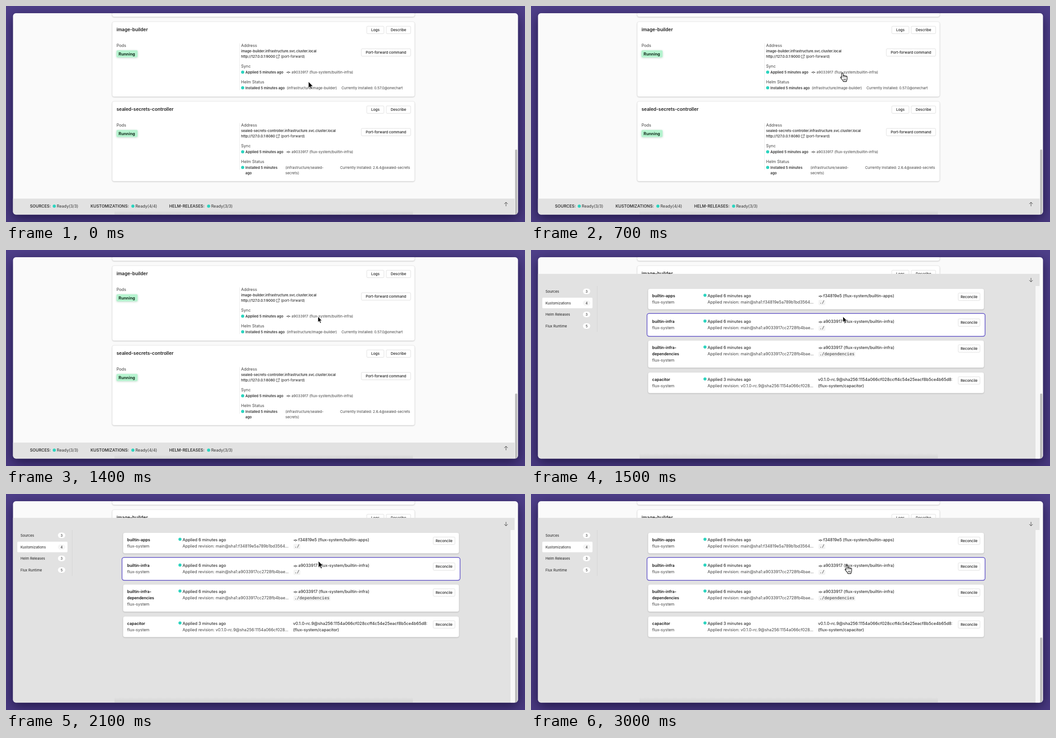
These frames come from a looping animation (1148 px wide and 480 px high, 3100 ms). An HTML page:

```html
<!DOCTYPE html>
<html lang="en">
<head>
<meta charset="utf-8">
<title>Cluster services</title>
<style>
html, body { margin: 0; width: 100%; height: 100%; overflow: hidden; background: #4a3b82; }
svg { display: block; width: 1148px; height: 480px; font-family: Inter, "Liberation Sans", sans-serif; }
text { white-space: pre; }
.mono { font-family: "DejaVu Sans Mono", monospace; }
.card { fill: #fff; stroke: #dedede; stroke-width: .6; filter: drop-shadow(0 1px 1.2px rgba(0,0,0,.18)); }
.selected { fill: #fff; stroke: #5d4fc6; stroke-width: 1.5; }
.button { fill: #fff; stroke: #d6d6d6; stroke-width: .8; }
.window { fill: #fafafa; filter: drop-shadow(0 7px 13px rgba(14,6,46,.68)); }
</style>
</head>
<body>
<svg id="stage" viewBox="0 0 1148 480"></svg>
<script>
const TEAL = '#2dd4bf', INK = '#1f1f1f', GREY = '#404040', PANEL = '#e2e2e2';

const text = (x, y, s, size = 9, weight = 400, fill = GREY, extra = '') =>
  `<text x="${x}" y="${y}" font-size="${size}" font-weight="${weight}" fill="${fill}" ${extra}>${s}</text>`;
const rect = (x, y, w, h, fill, r = 0, extra = '') =>
  `<rect x="${x}" y="${y}" width="${w}" height="${h}" rx="${r}" fill="${fill}" ${extra}/>`;
const box = (kind, x, y, w, h, r) => rect(x, y, w, h, '#fff', r, `class="${kind}"`);
const dot = (x, y, r = 3.5) => `<circle cx="${x}" cy="${y}" r="${r}" fill="${TEAL}"/>`;
const line = (d, color = INK, w = .9) => `<path d="${d}" fill="none" stroke="${color}" stroke-width="${w}"/>`;
const centred = (x, y, s, size, weight, fill) => text(x, y, s, size, weight, fill, 'text-anchor="middle"');
const button = (x, y, w, s) =>
  box('button', x, y, w, 16.5, 2) + centred(x + w / 2, y + 11.2, s, 8, 500, INK);
const commit = (x, y) =>
  line(`M${x} ${y}h2.6m3.4 0h2.6`) + `<circle cx="${x + 4.3}" cy="${y}" r="1.7" fill="none" stroke="${INK}" stroke-width=".9"/>`;
const arrow = (y, dir) => line(`M1106 ${y - 4.5}v9m-4 ${dir > 0 ? -4 : -5}l4 ${dir * 4}l4 ${-dir * 4}`, '#444', 1);

function service(y, height, name, port, helm) {
  return `<g transform="translate(0 ${y})">` + box('card', 235, 0, 669, height, 4) +
    text(244.5, 21.3, name, 10.2, 600, INK) +
    button(798, 10, 38, 'Logs') + button(841, 10, 54, 'Describe') +
    text(244.5, 56, 'Pods') +
    rect(244.5, 63.5, 46.5, 15.5, '#b5f3cf', 2, 'style="filter:drop-shadow(0 1.5px 2px rgba(60,140,95,.35))"') +
    text(249, 74.6, 'Running', 9, 700, '#14301f') +
    line('M516.5 48V152', '#ececec', 1) +
    text(520, 56, 'Address') +
    text(520, 68.3, name + '.infrastructure.svc.cluster.local', 7.75, 500, INK) +
    text(520, 80, 'http://127.0.0.1:' + port, 7.75, 500, INK) +
    line('M601 74.6h-3v6h6v-3M602 73.8h3v3M605 73.8l-4.2 4.2', GREY, .8) +
    text(608, 80, '(port-forward)', 7.85, 400, INK) +
    button(786, 60, 109, 'Port-forward command') +
    text(520, 102.3, 'Sync') + dot(523.5, 112) +
    text(529.5, 114.8, 'Applied 5 minutes ago', 7.8, 600, '#333') +
    commit(620.3, 112.4) +
    text(631.5, 114.8, 'a9033917 (flux-system/builtin-infra)', 8) +
    text(520, 137.3, 'Helm Status') + dot(523.5, 146.8) + helm + '</g>';
}

const bold = (x, y, s) => text(x, y, s, 7.8, 600, '#333');
const small = (x, y, s) => text(x, y, s, 7.9);

const services =
  box('card', 235, 0, 669, 24, 4) +
  service(35, 166.5, 'image-builder', 9000,
    bold(529.5, 149.8, 'Installed 5 minutes ago') +
    small(621, 149.8, '(infrastructure/image-builder)') +
    small(742, 149.8, 'Currently Installed: 0.57.0@onechart')) +
  service(212, 177.5, 'sealed-secrets-controller', 8080,
    bold(529.5, 149.8, 'Installed 5 minutes') + bold(529.5, 161.5, 'ago') +
    small(618, 149.8, '(infrastructure/sealed-') + small(618, 161.5, 'secrets)') +
    small(739, 149.8, 'Currently Installed: 2.6.4@sealed-secrets'));

const status = (x, label, dotX, count) =>
  text(x, 447.8, label, 9, 600, '#333') + dot(dotX, 444.8) + text(dotX + 5.5, 447.8, `Ready(${count})`, 9, 400, '#333');

const footer = rect(15, 428, 1110, 36, PANEL) + rect(240, 455, 660, 9, 'url(#fade)') +
  status(53, 'SOURCES:', 106.8, '3/3') +
  status(187, 'KUSTOMIZATIONS:', 280.7, '4/4') +
  status(361, 'HELM-RELEASES:', 448.2, '3/3') + arrow(440.5, -1);

const tab = (y, name, count, on) =>
  (on ? rect(25, y - 12, 111, 23.5, '#fff', 2) : '') +
  text(32, y + 2.8, name, 7.8, 400, INK) +
  rect(115, y - 6.3, 16, 12.4, on ? '#f5f5f5' : '#fff', 6.2) +
  centred(123, y + 2.5, count, 7, 500, '#333');

function row(y, height, names, age, revision, source, path, selected) {
  const last = names.length - 1, pad = selected ? 2.4 : 0;
  return `<g transform="translate(0 ${y})">` +
    box(selected ? 'selected' : 'card', 259 - pad, -pad, 743 + 2 * pad, height + 2 * pad, 4 + pad / 4) +
    names.map((s, i) => text(268, 19 + 14 * i, s, 8.7, 600, '#111')).join('') +
    text(268, 33 + 14 * last, 'flux-system', 8.85) +
    dot(384.8, 14.6, 3.4) + text(390.5, 19, `Applied ${age} minutes ago`, 9, 500, '#333') +
    text(390.5, 33, `Applied revision: ${revision}...`, 9) +
    (path
      ? commit(636, 16.8) + text(646.5, 19, source, 9.05, 500, '#333') +
        rect(636, 25, path.length * 5.54 + 4, 11.5, '#f3f3f3', 2) +
        text(638, 33, path, 9.2, 400, '#333', 'class="mono"')
      : text(635, 19, source, 9.15, 500, '#333', 'clip-path="url(#cell)"') +
        text(635, 33, '(flux-system/capacitor)', 9, 500, '#333')) +
    button(945, 9.7, 48, 'Reconcile') + '</g>';
}

const infra = 'a9033917 (flux-system/builtin-infra)', infraRev = 'main@sha1:a9033917cc2728fb4bae';
const panel = rect(15, 53, 1110, 411, PANEL) + rect(1116, 80, 9, 384, '#f7f7f7') +
  rect(240, 452, 660, 12, 'url(#fade)') + arrow(66.5, 1) +
  tab(92, 'Sources', 3) + tab(118, 'Kustomizations', 4, true) +
  tab(143.3, 'Helm Releases', 3) + tab(169, 'Flux Runtime', 5) +
  line('M146.5 80V182', '#d5d5d5', 1) +
  row(86, 46, ['builtin-apps'], 6, 'main@sha1:f34819e5a789b1bd3564', 'f34819e5 (flux-system/builtin-apps)', './') +
  row(143.3, 46, ['builtin-infra'], 6, infraRev, infra, './', true) +
  row(201, 60.5, ['builtin-infra-', 'dependencies'], 6, infraRev, infra, './dependencies') +
  row(272, 46, ['capacitor'], 3, 'v0.1.0-rc.9@sha256:1154a066cf028',
    'v0.1.0-rc.9@sha256:1154a066cf028ccff4c54e25eacf8b5ce4b65d8:');

const cursors =
  `<g id="cursor"><path id="pointer" d="M0 0V14.4L3.3 11.3L5.7 16.8L8 15.8L5.7 10.4H10Z" fill="#000" stroke="#fff" stroke-width=".9"/>
  <g id="hand" transform="translate(-6 -.6) scale(1.05)" stroke="#000" stroke-linejoin="round">
  <path d="M3 11V3a1.6 1.6 0 0 1 3.2 0v4.6a1.5 1.5 0 0 1 2.9 .4a1.5 1.5 0 0 1 2.8 .6a1.4 1.4 0 0 1 2.6 .9V14c0 2-1.5 3-1.5 5.5H6.5C6 17 3.2 14.6 1 11.6C0 9.8 1.6 8.9 3 11Z" fill="#fff" stroke-width="1.1"/>
  <path d="M6.2 7.6V11M9.1 8V11M11.9 8.6V11M7.4 13.5v3.5M9.4 13.5v3.5M11.4 13.5v3.5" fill="none" stroke-width=".8"/></g></g>`;

const stage = document.getElementById('stage');
stage.innerHTML = `<defs>
  <linearGradient id="fade" x2="0" y2="1"><stop stop-color="#999" stop-opacity="0"/><stop offset="1" stop-color="#999" stop-opacity=".22"/></linearGradient>
  <linearGradient id="purple" x2="0" y2="1"><stop stop-color="#4e3f89"/><stop offset="1" stop-color="#48397f"/></linearGradient>
  <clipPath id="view"><rect x="15.5" y="16" width="1117" height="447.5" rx="6.5"/></clipPath>
  <clipPath id="cell"><rect x="630" y="0" width="301.5" height="40"/></clipPath></defs>` +
  rect(0, 0, 1148, 480, 'url(#purple)') + rect(15.5, 16, 1117, 447.5, '#fafafa', 6.5, 'class="window"') +
  `<g clip-path="url(#view)">${services}<g id="footer">${footer}</g><g id="panel">${panel}</g>` +
  rect(1126, 319, 5, 145, '#bcbcbc', 2) + `</g>${cursors}`;

const [footerEl, panelEl, cursor, pointer, hand] =
  ['footer', 'panel', 'cursor', 'pointer', 'hand'].map(id => document.getElementById(id));
const show = (el, on) => el.setAttribute('visibility', on ? 'visible' : 'hidden');

// Cursor stops: time, x, y
const stops = [[0, 669, 168], [600, 690, 148], [2000, 690, 148], [2100, 691, 149], [2500, 691, 149], [3000, 700, 157], [3100, 700, 157]];

function position(t) {
  const i = stops.findIndex(s => s[0] > t);
  const [t0, x0, y0] = stops[i - 1], [t1, x1, y1] = stops[i];
  const k = (t - t0) / (t1 - t0), e = k * k * (3 - 2 * k);
  return [x0 + (x1 - x0) * e, y0 + (y1 - y0) * e];
}

function draw() {
  const t = Math.floor(performance.now() % 3100 / 100) * 100;
  const open = t >= 1500, hovering = (t >= 500 && t < 1300) || t >= 2600;
  const visible = t !== 2500, pressed = t >= 1300 && t < 1700;
  const [x, y] = position(t);
  show(footerEl, !open);
  show(panelEl, open);
  show(pointer, visible && !hovering);
  show(hand, visible && hovering);
  cursor.setAttribute('transform', `translate(${x} ${y}) scale(${pressed ? .87 : 1})`);
  requestAnimationFrame(draw);
}
draw();
</script>
</body>
</html>
```
